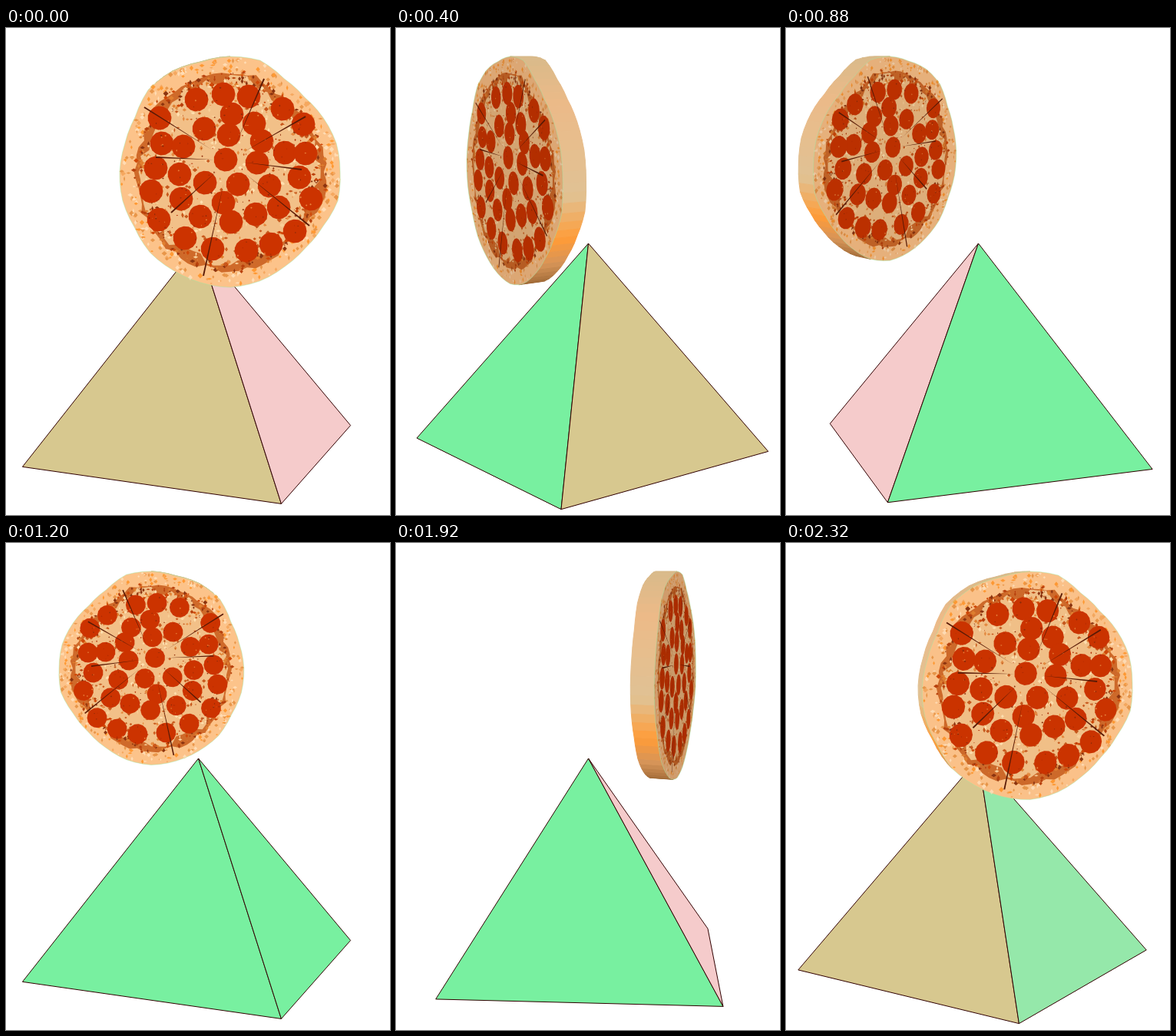
An HTML page with a canvas that plays this animation: 500x633 px, repeating every 2400 ms.

```html
<!DOCTYPE html>
<html>
<head>
<meta charset="utf-8">
<style>
html, body { margin: 0; width: 100%; height: 100%; overflow: hidden; background: #fff; }
canvas { display: block; }
</style>
</head>
<body>
<canvas id="stage" width="500" height="633"></canvas>
<script>
const ctx = document.getElementById('stage').getContext('2d');
const RAD = Math.PI / 180, DEPTH = 1232, HALF = 14.5, FACE = 1.109;
const CX = 292, CY = 187, TOP = 36;
const GREEN = [120, 240, 160], PINK = [245, 203, 203], TAN = [215, 200, 143];

// Pizza outline: radius every 15 degrees, clockwise from the right
const RIM = [143, 145, 140, 139, 142, 147, 150, 149, 148, 148, 144, 145,
  144, 142, 143, 151, 151, 148, 150, 150, 140, 137, 140, 143];
const PEPPERONI = [[248, 93], [283, 86], [316, 89], [294, 112], [258, 131], [290, 139],
  [360, 105], [387, 125], [323, 124], [333, 147], [200, 117], [203, 150], [231, 154],
  [286, 171], [327, 175], [363, 162], [390, 163], [382, 194], [195, 182], [226, 190],
  [259, 201], [302, 203], [343, 205], [189, 212], [228, 222], [283, 227], [253, 245],
  [293, 252], [325, 242], [355, 233], [397, 222], [376, 264], [199, 249], [233, 273],
  [269, 287], [313, 289], [345, 281]];
const CUTS = [[180, 103], [336, 66], [390, 115], [385, 184],
  [395, 257], [257, 322], [215, 240], [195, 168]];

let seed = 7;
const rand = () => (seed = seed * 16807 % 2147483647) / 2147483647;

const mix = (a, b, m) => a.map((v, i) => v + (b[i] - v) * m);
const rgb = c => `rgb(${c.map(Math.round)})`;
const mod = (a, n) => ((a % n) + n) % n;

function edge(deg, f = 1) {
  const p = mod(deg, 360) / 15, i = Math.floor(p);
  const r = f * (RIM[i] + (RIM[(i + 1) % 24] - RIM[i]) * (p - i));
  return [CX + r * Math.cos(deg * RAD), CY + r * Math.sin(deg * RAD)];
}

function ring(f, wobble = 0) {
  const pts = [];
  for (let d = 0; d < 360; d += 5) pts.push(edge(d, f + (rand() - .5) * wobble));
  return pts;
}

function disc([x, y], r) {
  const pts = [];
  for (let d = 0; d < 360; d += 24)
    pts.push([x + r * Math.cos(d * RAD), y + r * Math.sin(d * RAD)]);
  return pts;
}

function specks(n, from, to, size, colors) {
  return Array.from({ length: n }, () => {
    const f = Math.sqrt(from * from + rand() * (to * to - from * from));
    const [x, y] = edge(rand() * 360, f);
    const w = size * (.4 + rand()), h = size * (.4 + rand());
    const pts = [[x - w, y], [x, y - h], [x + w, y], [x, y + h]];
    return { pts, color: colors[Math.floor(rand() * colors.length)] };
  });
}

const cut = ([x, y]) => {
  const l = Math.hypot(x - 290, y - 172), nx = (y - 172) / l, ny = (290 - x) / l;
  return [[290 + (x - 290) * .2, 172 + (y - 172) * .2], [x + nx, y + ny], [x - nx, y - ny]];
};

const outline = ring(1);
const layers = [
  { pts: outline, color: '#fcc38a' },
  ...specks(260, .87, .99, 2.6, ['#ff9933', '#f5a860', '#ffdcb4', '#e8964a']),
  { pts: ring(.86, .05), color: '#cf6a2a' },
  { pts: ring(.8, .09), color: '#f2c088' },
  ...specks(330, .7, .88, 2.6, ['#b8400c', '#8c3410', '#e08030', '#d04808']),
  ...specks(420, 0, .82, 2.4, ['#ffe0b0', '#e58a40', '#c8581c', '#f8cf98']),
  ...PEPPERONI.map(p => ({ pts: disc(p, 15.5), color: '#cc3300' })),
  ...specks(240, 0, .86, 1.1, ['#8c2a08', '#b02c04', '#e8843c']),
  ...CUTS.map(c => ({ pts: cut(c), color: '#5a1a06' }))
];

function poly(pts, color, line) {
  ctx.beginPath();
  pts.forEach(p => ctx.lineTo(...p));
  ctx.closePath();
  if (color) {
    ctx.fillStyle = color;
    ctx.fill();
  }
  if (line) {
    ctx.strokeStyle = line;
    ctx.stroke();
  }
}

function pyramid(step) {
  const turn = 22.8 + 12 * step + 45;
  const front = mod(turn, 90) - 45, count = Math.floor(turn / 90);
  const corner = deg => {
    const c = Math.cos(deg * RAD), s = 1 / (1 - .187 * c);
    return [250.5 + 230.5 * Math.sin(deg * RAD) * s, (541 - 32.1 * c) * s + .5];
  };
  const side = (i, normal) => {
    i = mod(i, 4);
    if (i < 2) return rgb(i ? GREEN : TAN);
    const m = (Math.abs(normal - 4) - 50.2) / 7;
    return rgb(mix(GREEN, PINK, Math.min(1, Math.max(0, m))));
  };
  const apex = [250.5, 280], mid = corner(front);
  ctx.lineWidth = 1;
  poly([apex, corner(front - 90), mid], side(count, front - 45), '#300000');
  poly([apex, mid, corner(front + 90)], side(count + 3, front + 45), '#300000');
}

const BAND = [[0, [216, 186, 138]], [.2, [236, 186, 136]], [.55, [224, 194, 148]],
  [.74, [255, 156, 56]], [.86, [214, 148, 88]], [1, [150, 98, 48]]];

function crust(v) {
  const i = Math.max(1, BAND.findIndex(b => b[0] >= v));
  const [a, ca] = BAND[i - 1], [b, cb] = BAND[i];
  return rgb(mix(ca, cb, (v - a) / (b - a)));
}

function pizza(step) {
  const cos = Math.cos(-12 * step * RAD), sin = Math.sin(-12 * step * RAD);
  const project = w => ([px, py]) => {
    const x = 50.5 + (px - CX) / FACE, z = 107 + w;
    const s = 1 / (1 - (z * cos - x * sin) / DEPTH);
    return [236 + (x * cos + z * sin) * s, TOP + (py - TOP) / FACE * s];
  };
  const cross = (a, b, c) => (b[0] - a[0]) * (c[1] - b[1]) - (b[1] - a[1]) * (c[0] - b[0]);

  const near = outline.map(project(HALF)), far = outline.map(project(-HALF));
  ctx.lineWidth = 1;
  outline.forEach((p, i) => {
    const j = (i + 1) % outline.length;
    const quad = [near[i], near[j], far[j], far[i]];
    if (cross(...quad) >= 0) return;
    const v = ((p[1] + outline[j][1]) / 2 - TOP) / 302;
    const color = crust(Math.min(1, Math.max(0, v)));
    poly(quad, color, color);
  });

  const facing = cross(near[0], near[24], near[48]) > 0;
  const place = project(facing ? HALF : -HALF);
  layers.forEach(l => poly(l.pts.map(place), l.color));
  const shade = .32 * (1 - Math.abs(cos));
  poly(outline.map(place), `rgba(50,20,0,${shade})`, 'rgba(150,235,165,.4)');
}

function draw() {
  const step = Math.floor(performance.now() / 80) % 30;
  ctx.fillStyle = '#fff';
  ctx.fillRect(0, 0, 500, 633);
  pyramid(step);
  pizza(step);
  requestAnimationFrame(draw);
}
draw();
</script>
</body>
</html>
```
